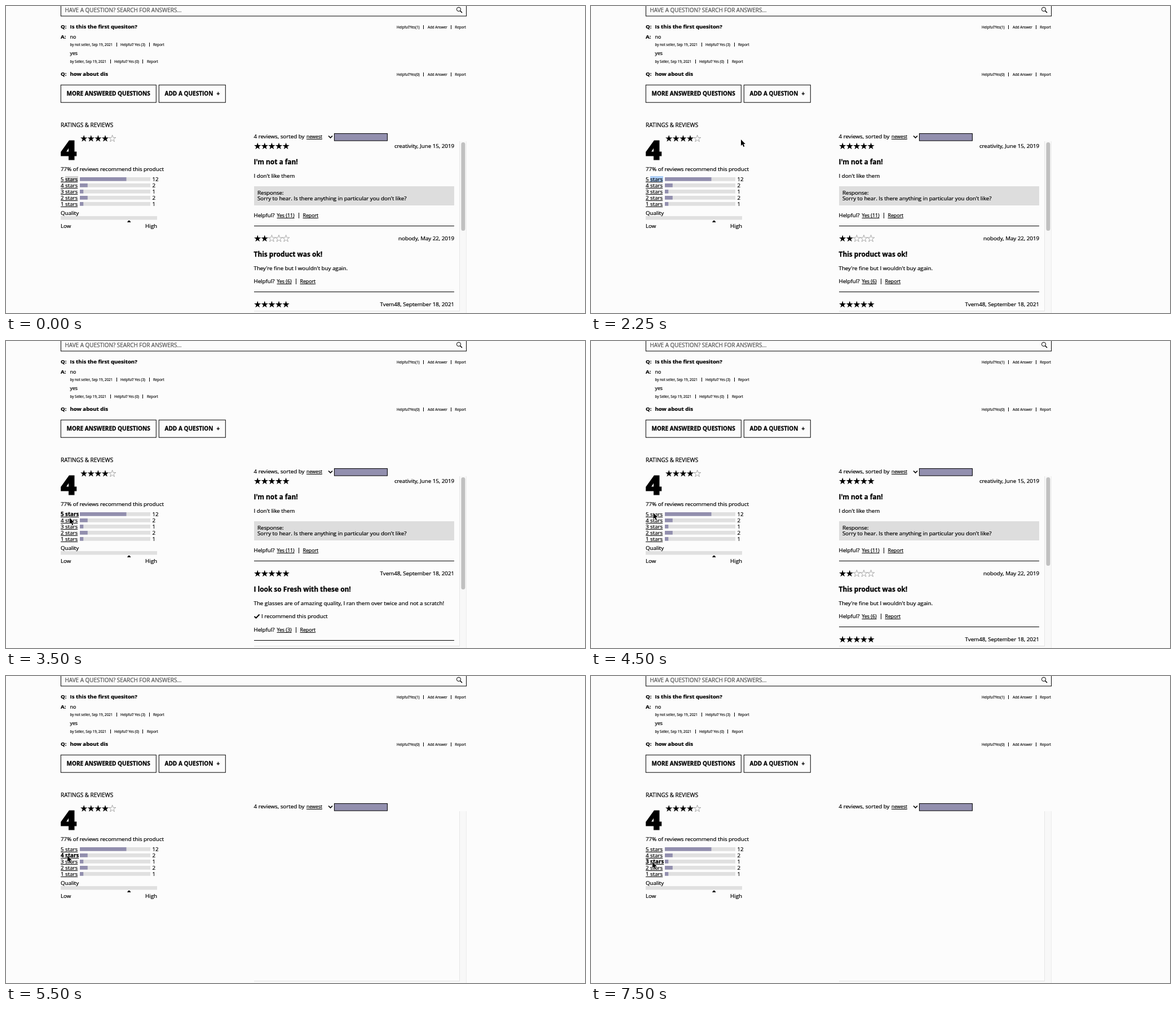
Recreate the animation shown at these times as an HTML page with a canvas. Size 1027 by 545 pixels, loop 8000 ms.

```html
<!DOCTYPE html>
<html lang="en">
<head>
<meta charset="utf-8">
<title>Ratings and reviews</title>
<style>
html, body { margin: 0; width: 100%; height: 100%; overflow: hidden; background: #fcfcfc; }
canvas { display: block; }
</style>
</head>
<body>
<canvas id="stage" width="1027" height="545"></canvas>
<script>
const ctx = document.getElementById('stage').getContext('2d');
const LOOP = 8000, STEP = 250;
const PURPLE = '#928fae', TRACK = '#e0e0e0', BLACK = '#000';
const BODY = 9.73, SMALL = 6.24, LINK = 8.75;

const reviews = [
  { stars: 5, by: 'creativity, June 15, 2019', title: "I'm not a fan!", body: "I don't like them",
    reply: "Sorry to hear. Is there anything in particular you don't like?", yes: 11 },
  { stars: 2, by: 'nobody, May 22, 2019', title: 'This product was ok!',
    body: "They're fine but I wouldn't buy again.", yes: 6 },
  { stars: 5, by: 'Tvem48, September 18, 2021', title: 'I look so Fresh with these on!',
    body: 'The glasses are of amazing quality, I ran them over twice and not a scratch!',
    recommend: true, yes: 3 }
];
const counts = [12, 2, 1, 2, 1];

// pointer path: time, x, y
const path = [
  [250, 618, 393], [1250, 412, 227], [2250, 266, 237], [2500, 150, 322], [2750, 124, 286],
  [3000, 113, 304], [3250, 113, 306], [3500, 113, 314], [3750, 113, 310], [4250, 111, 304],
  [4750, 110, 306], [5250, 109, 319], [5500, 109, 319], [6500, 109, 323], [6750, 109, 330],
  [8000, 109, 330]
];

function rect(x, y, w, h, color) {
  ctx.fillStyle = color;
  ctx.fillRect(x, y, w, h);
}

function frame(x, y, w, h) {
  ctx.strokeStyle = BLACK;
  ctx.lineWidth = 1;
  ctx.strokeRect(x, y, w, h);
}

function line(points, width) {
  ctx.strokeStyle = BLACK;
  ctx.lineWidth = width;
  ctx.beginPath();
  points.forEach(([x, y]) => ctx.lineTo(x, y));
  ctx.stroke();
}

// draws text on a whole-pixel baseline and returns its width
function text(str, x, y, { size = BODY, weight = 400, align = 'left', color = BLACK, under = false } = {}) {
  const base = Math.floor(y);
  ctx.font = `${weight} ${size}px "Open Sans", "Noto Sans", sans-serif`;
  ctx.textAlign = align;
  ctx.fillStyle = ctx.strokeStyle = color;
  ctx.fillText(str, x, base);
  ctx.lineWidth = size * 0.025;
  ctx.strokeText(str, x, base);
  const w = ctx.measureText(str).width;
  if (under) rect(x, base + 1, w, 1, BLACK);
  return w;
}

function stars(x, y, n) {
  for (let i = 0; i < 5; i++) {
    ctx.beginPath();
    for (let k = 0; k < 10; k++) {
      const r = k % 2 ? 2.5 : 6.5, a = k * Math.PI / 5 - Math.PI / 2;
      ctx.lineTo(x + i * 12.6 + r * Math.cos(a), y + 0.5 + r * Math.sin(a));
    }
    ctx.closePath();
    if (i < n) {
      ctx.fillStyle = BLACK;
      ctx.fill();
    } else {
      ctx.strokeStyle = '#888';
      ctx.lineWidth = 0.7;
      ctx.stroke();
    }
  }
}

function smallRow(y, items, seps) {
  items.forEach(([str, x]) => text(str, x, y, { size: SMALL }));
  seps.forEach(x => rect(x, y - 6, 1, 7, BLACK));
}

function questions() {
  frame(97.4, -10, 719.2, 27.9);
  text('HAVE A QUESTION? SEARCH FOR ANSWERS...', 104.5, 11, { size: 9.93, color: '#555' });
  ctx.strokeStyle = BLACK;
  ctx.lineWidth = 1;
  ctx.beginPath();
  ctx.arc(803, 5.8, 3.6, 0, 7);
  ctx.stroke();
  line([[805.6, 8.4], [809, 12]], 1.5);

  const bold = { weight: 700, size: 9.65 };
  text('Q:', 97, 40, bold);
  text('Is this the first quesiton?', 113.5, 40, bold);
  text('A:', 97, 58, bold);
  text('no', 113.5, 58, { size: 8.8 });
  smallRow(71, [['by not seller, Sep 19, 2021', 113.5], ['Helpful? Yes (3)', 203], ['Report', 261]], [196, 254]);
  text('yes', 113.5, 87, { size: 8.8 });
  smallRow(101, [['by Seller, Sep 19, 2021', 113.5], ['Helpful? Yes (0)', 192], ['Report', 250]], [185, 242]);
  text('Q:', 97, 124, bold);
  text('how about dis', 113.5, 124, bold);
  [[40, 1], [124, 0]].forEach(([y, n]) =>
    smallRow(y, [[`Helpful?Yes(${n})`, 693], ['Add Answer', 748], ['Report', 796.3]], [740, 789]));

  frame(97.3, 140.2, 169, 31);
  frame(271.3, 140.2, 118, 31);
  const caps = { weight: 700, size: 10.05 };
  text('MORE ANSWERED QUESTIONS', 107.5, 159, caps);
  text('ADD A QUESTION', 281.5, 159, caps);
  text('+', 373.5, 159, caps);
}

function ratings(active, selection) {
  text('RATINGS & REVIEWS', 97, 215, { size: 9.95 });
  text('4', 97, 273, { size: 48.5, weight: 800 });
  stars(138.2, 235, 4);
  text('77% of reviews recommend this product', 97, 293, { size: 9.78 });
  if (selection) rect(105, 302, 23, 10, selection);
  counts.forEach((n, i) => {
    const y = 311 + i * 11, star = 5 - i;
    rect(131, y - 7, 125, 6.7, TRACK);
    rect(131, y - 7, 125 * Math.floor(n / 18 * 100) / 100, 6.7, PURPLE);
    text(`${star} stars`, 97, y, { weight: star === active ? 700 : 400, under: true });
    text(n, 259.5, y);
  });
  text('Quality', 97, 371);
  rect(97, 373, 171, 6.5, TRACK);
  ctx.fillStyle = BLACK;
  ctx.beginPath();
  ctx.moveTo(215, 384);
  ctx.quadraticCurveTo(218, 377, 221.5, 384);
  ctx.fill();
  text('Low', 97, 394);
  text('High', 268, 394, { align: 'right' });
}

// draws one review with its stars centred on y, returns the centre for the next
function review(r, y) {
  stars(446.2, y, r.stars);
  text(r.by, 795, y + 3.5, { align: 'right' });
  text(r.title, 439.5, y + 32.5, { size: 11.9, weight: 700 });
  text(r.body, 439.5, y + 56.5);
  let base = y + 80;
  if (r.reply) {
    rect(440, y + 71.5, 355, 34, '#dddddd');
    text('Response:', 446, y + 86.5);
    text(r.reply, 446, y + 97);
    base += 47;
  }
  if (r.recommend) {
    line([[440.5, base - 3.5], [443.5, base - 0.8], [449.5, base - 7]], 2);
    text('I recommend this product', 453, base);
    base += 23.5;
  }
  text('Helpful?', 439.5, base);
  const end = 480.5 + text(`Yes (${r.yes})`, 480.5, base, { size: LINK, under: true });
  rect(Math.round(end + 7), Math.floor(base) - 8, 1, 10, BLACK);
  text('Report', end + 15, base, { size: LINK, under: true });
  rect(440, Math.round(base + 14.5), 355, 1, BLACK);
  return base + 37;
}

function reviewList(active) {
  text('4 reviews, sorted by', 439.5, 235, { size: 9.8 });
  text('newest', 533, 235, { size: 8.4, under: true });
  line([[572, 230.5], [575.5, 234], [579, 230.5]], 1.7);
  rect(582, 226, 95, 13, PURPLE);
  frame(582.4, 226.4, 94, 12.8);

  rect(804, 240, 13, 305, '#f8f8f8');
  rect(440, 541, 377, 4, '#f9f9f9');
  rect(804, 240, 1, 302, '#e6e6e6');
  rect(816, 240, 1, 305, '#ebebeb');
  rect(440, 541, 365, 1, '#e3e3e3');

  const shown = reviews.filter(r => !active || r.stars === active);
  if (!shown.length) return;
  ctx.fillStyle = '#c0c0c0';
  ctx.beginPath();
  ctx.roundRect(807.4, 242, 7, active ? 199 : 157, 3.5);
  ctx.fill();
  ctx.save();
  ctx.beginPath();
  ctx.rect(430, 238, 374, 303);
  ctx.clip();
  shown.reduce((y, r) => review(r, y), 248.5);
  ctx.restore();
}

function pointer(t) {
  const i = path.findIndex(p => p[0] > t);
  if (i < 1) return;
  const [t0, x0, y0] = path[i - 1], [t1, x1, y1] = path[i];
  // rests on the row while the filter is on
  const k = t0 === 5500 ? 0 : (t - t0) / (t1 - t0);
  const x = x0 + (x1 - x0) * k, y = y0 + (y1 - y0) * k;
  const shape = [[0, 0], [0, 11], [2.5, 8.7], [4.4, 13], [6.3, 12.2], [4.5, 8], [7.8, 8]];
  ctx.beginPath();
  shape.forEach(([dx, dy]) => ctx.lineTo(x + dx, y + dy));
  ctx.closePath();
  ctx.strokeStyle = '#fff';
  ctx.lineWidth = 1.4;
  ctx.stroke();
  ctx.fillStyle = BLACK;
  ctx.fill();
}

function activeFilter(t) {
  if (t >= 3250 && t < 4500) return 5;
  if (t >= 5500 && t < 6500) return 4;
  return t >= 7250 ? 3 : 0;
}

function draw(now) {
  const t = Math.floor((now % LOOP) / STEP) * STEP;
  const active = activeFilter(t);
  const selection = t < 1500 ? '#d2d2d2' : t < 3250 ? '#accef7' : null;
  rect(0, 0, 1027, 545, '#fcfcfc');
  questions();
  ratings(active, selection);
  reviewList(active);
  pointer(t);
}

const start = performance.now();
function tick() {
  draw(performance.now() - start);
  requestAnimationFrame(tick);
}
tick();
</script>
</body>
</html>
```
